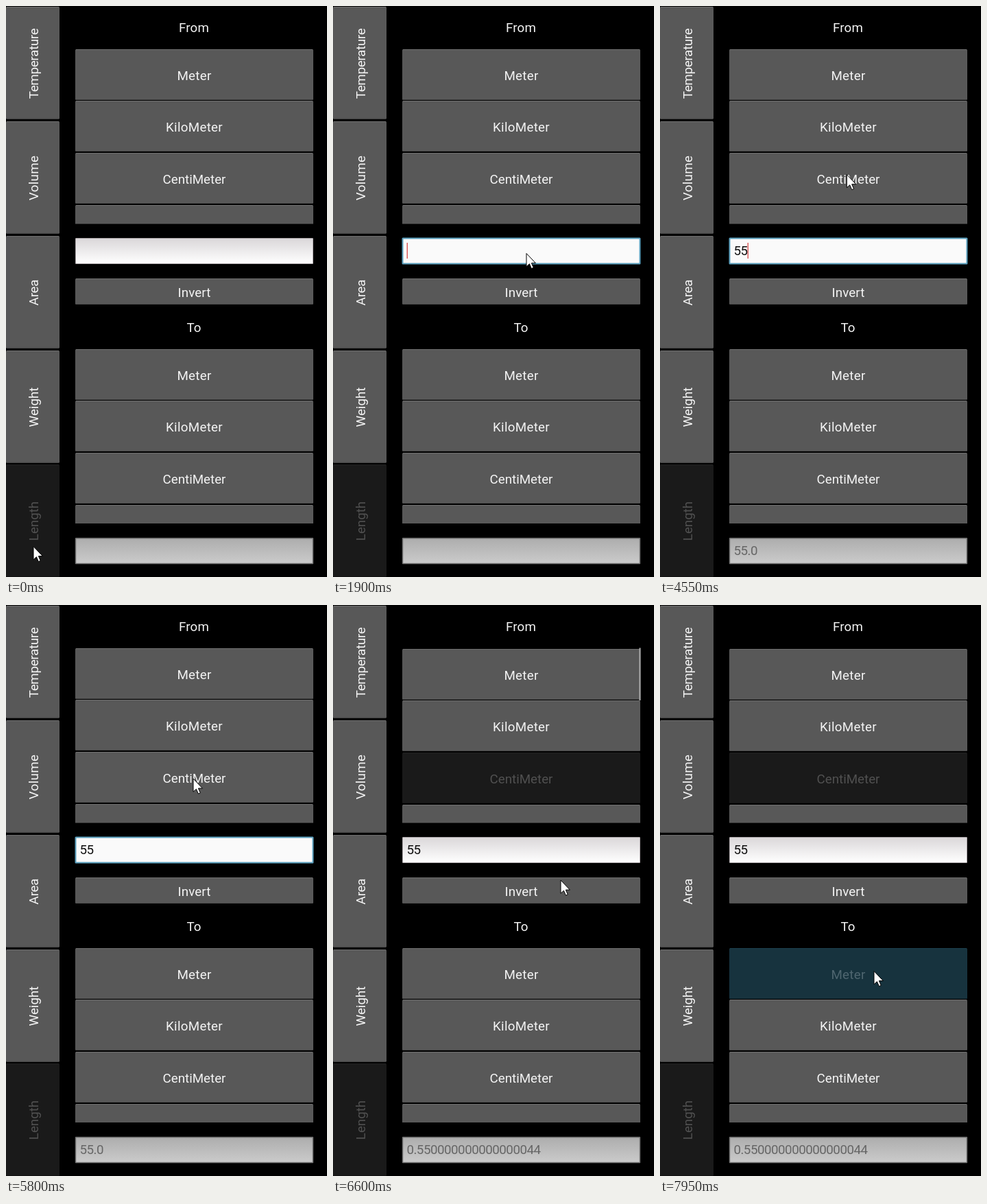
Animation of 468 by 832 pixels, one loop 8 s. Source, as an HTML page:

```html
<!DOCTYPE html>
<html lang="en">
<head>
<meta charset="utf-8">
<title>Unit converter</title>
<style>
  html, body { margin: 0; width: 100%; height: 100%; overflow: hidden; background: #000; }
  svg { display: block; width: 468px; height: 832px; }
  text { font: 18.75px Roboto, sans-serif; fill: #f4f4f4; white-space: pre; }
  .mid { text-anchor: middle; }
  .num { letter-spacing: -.5px; }
</style>
</head>
<body>
<svg id="stage" viewBox="0 0 468 832" xmlns="http://www.w3.org/2000/svg">
  <defs>
    <linearGradient id="light" x2="0" y2="1">
      <stop offset="0" stop-color="#dad7d9"/>
      <stop offset="1" stop-color="#fff"/>
    </linearGradient>
    <linearGradient id="grey" x2="0" y2="1">
      <stop offset="0" stop-color="#adadad"/>
      <stop offset="1" stop-color="#cbcbcb"/>
    </linearGradient>
    <clipPath id="clipFrom"><rect x="100" y="62" width="349" height="255.5"/></clipPath>
    <clipPath id="clipTo"><rect x="100" y="499" width="349" height="255"/></clipPath>
  </defs>
</svg>
<script>
const LOOP = 8000, STEP = 50;
const stage = document.getElementById('stage');

function add(parent, tag, attrs, content) {
  const el = document.createElementNS('http://www.w3.org/2000/svg', tag);
  set(el, attrs);
  if (content) el.textContent = content;
  parent.appendChild(el);
  return el;
}

function set(el, attrs) {
  for (const key in attrs) el.setAttribute(key, attrs[key]);
}

const LOOKS = {
  normal: { fill: '#585858', edge: '#6f6f6f', low: '#484848', ink: '#f4f4f4' },
  off: { fill: '#1a1a1a', edge: '#232323', low: '#141414', ink: '#505050' },
  press: { fill: '#17333e', edge: '#1d4351', low: '#122a34', ink: '#4f6670' }
};

function label(parent, x, y, str, gap = 0, turn = 0) {
  return add(parent, 'text', {
    class: 'mid', x, y, 'letter-spacing': gap,
    transform: turn ? `rotate(${turn} ${x} ${y})` : ''
  }, str);
}

// Returns a function that switches the look of the button.
function button(parent, x, y, w, h, makeLabel) {
  const body = add(parent, 'rect', { x, y, width: w, height: h, rx: 1.5 });
  const top = add(parent, 'rect', { x: x + 1, y, width: w - 2, height: 1 });
  const low = add(parent, 'rect', { x: x + 1, y: y + h - 1, width: w - 2, height: 1 });
  const text = makeLabel && makeLabel();
  const show = name => {
    const look = LOOKS[name];
    set(body, { fill: look.fill });
    set(top, { fill: look.edge });
    set(low, { fill: look.low });
    if (text) text.style.fill = look.ink;
  };
  show('normal');
  return show;
}

function field(y, fill, stroke) {
  return add(stage, 'rect', {
    x: 101.5, y, width: 346, height: 37, rx: .5, fill, stroke, 'stroke-width': 1.5
  });
}

// Sidebar
const TABS = [
  ['Temperature', 1, 84, -.3], ['Volume', 168, 250.5, .3], ['Area', 335, 417.5, -.2],
  ['Weight', 502, 584.5, 0], ['Length', 668, 750.5, 0]
];
for (const [name, y, cy, gap] of TABS) {
  const show = button(stage, 0, y, 78, 163.8, () => label(stage, 46.5, cy, name, gap, -90));
  if (name === 'Length') show('off');
}

// Unit lists
const UNITS = [['Meter', 0, .25], ['KiloMeter', 75, .3], ['CentiMeter', 151, 0], ['', 227, 0]];
function unitList(top, clip) {
  const frame = add(stage, 'g', { 'clip-path': `url(#${clip})` });
  const rows = add(frame, 'g', {});
  const shows = UNITS.map(([name, dy, gap]) =>
    button(rows, 101, top + dy, 347, 74,
      () => label(rows, 274.5, top + dy + 44.6, name, gap)));
  return { frame, rows, shows };
}
label(stage, 274, 37.5, 'From', .2);
label(stage, 274, 475, 'To');
const from = unitList(63, 'clipFrom');
const to = unitList(500, 'clipTo');
const bar = add(from.frame, 'rect', { x: 446.4, y: 62.5, width: 2.2, height: 76.5, fill: '#b3b3b3' });

button(stage, 101, 397, 347, 38, () => label(stage, 274.5, 424, 'Invert', .1));

// Input and result
const input = field(338.5);
const typed = add(stage, 'text', { class: 'num', x: 107.4, y: 362.9 });
typed.style.fill = '#111';
const caret = add(stage, 'rect', { y: 345, width: 1.3, height: 23, fill: '#d84848' });
field(775.5, 'url(#grey)', '#6c6c6c');
const result = add(stage, 'text', { class: 'num', x: 107.4, y: 799.5 });
result.style.fill = '#666';

const arrow = add(stage, 'path', {
  d: 'M0 0V19.2L4.4 15.2 7.4 22.1 10.3 20.8 7.4 14.1H13.4Z',
  fill: '#fff', stroke: '#000', 'stroke-width': 1
});

const smooth = u => u * u * (3 - 2 * u);
const easeIn = u => u * (.55 + .45 * u);
const easeOut = u => 1 - (1 - u) * (1 - u);

// Pointer keys: time, x, y, easing towards the key
const PATH = [
  [50, 40, 787.5], [550, 291, 303, smooth], [800, 282, 360.5, smooth],
  [4200, 282, 360.5], [4500, 272, 243, smooth], [4650, 273, 253, smooth],
  [6300, 273, 253], [6600, 332, 401, easeIn], [7150, 323, 642, easeOut],
  [7300, 323, 642], [7500, 312, 533.5, smooth]
];

function pointer(t) {
  const i = PATH.findIndex(key => key[0] > t);
  if (i === 0) return PATH[0].slice(1, 3);
  if (i < 0) return PATH[PATH.length - 1].slice(1, 3);
  const [t0, x0, y0] = PATH[i - 1], [t1, x1, y1, ease = smooth] = PATH[i];
  const u = ease((t - t0) / (t1 - t0));
  return [x0 + (x1 - x0) * u, y0 + (y1 - y0) * u];
}

const BLINKS = [[950, 1450], [1850, 2350], [2750, 3250], [3300, 3750], [4250, 4800], [5300, 5800]];

function draw(t) {
  const value = t < 2750 ? '' : t < 3300 ? '5' : '55';
  typed.textContent = value;
  result.textContent = t >= 5950 ? '0.550000000000000044' : value && value + '.0';

  const focus = t >= 950 && t < 5950;
  set(input, {
    fill: focus ? '#fafafa' : 'url(#light)',
    stroke: focus ? '#5a9fbe' : '#a9a3a6',
    'stroke-width': focus ? 2 : 1
  });
  set(caret, {
    x: 107.6 + 10 * value.length,
    visibility: BLINKS.some(([a, b]) => t >= a && t < b) ? 'visible' : 'hidden'
  });

  from.shows[2](t < 5950 ? 'normal' : t < 6050 ? 'press' : 'off');
  to.shows[0](t < 7950 ? 'normal' : 'press');
  set(from.rows, { transform: `translate(0 ${t >= 6350 ? 1 : 0})` });
  const fade = Math.min(1, Math.max(0, (7150 - t) / 500));
  set(bar, { opacity: t >= 6350 ? .9 * fade : 0 });

  const [x, y] = pointer(t);
  set(arrow, { transform: `translate(${x.toFixed(1)} ${y.toFixed(1)})` });
}

const start = performance.now();
function tick() {
  const t = (performance.now() - start) % LOOP;
  draw(Math.floor(t / STEP) * STEP);
  requestAnimationFrame(tick);
}
tick();
</script>
</body>
</html>
```
